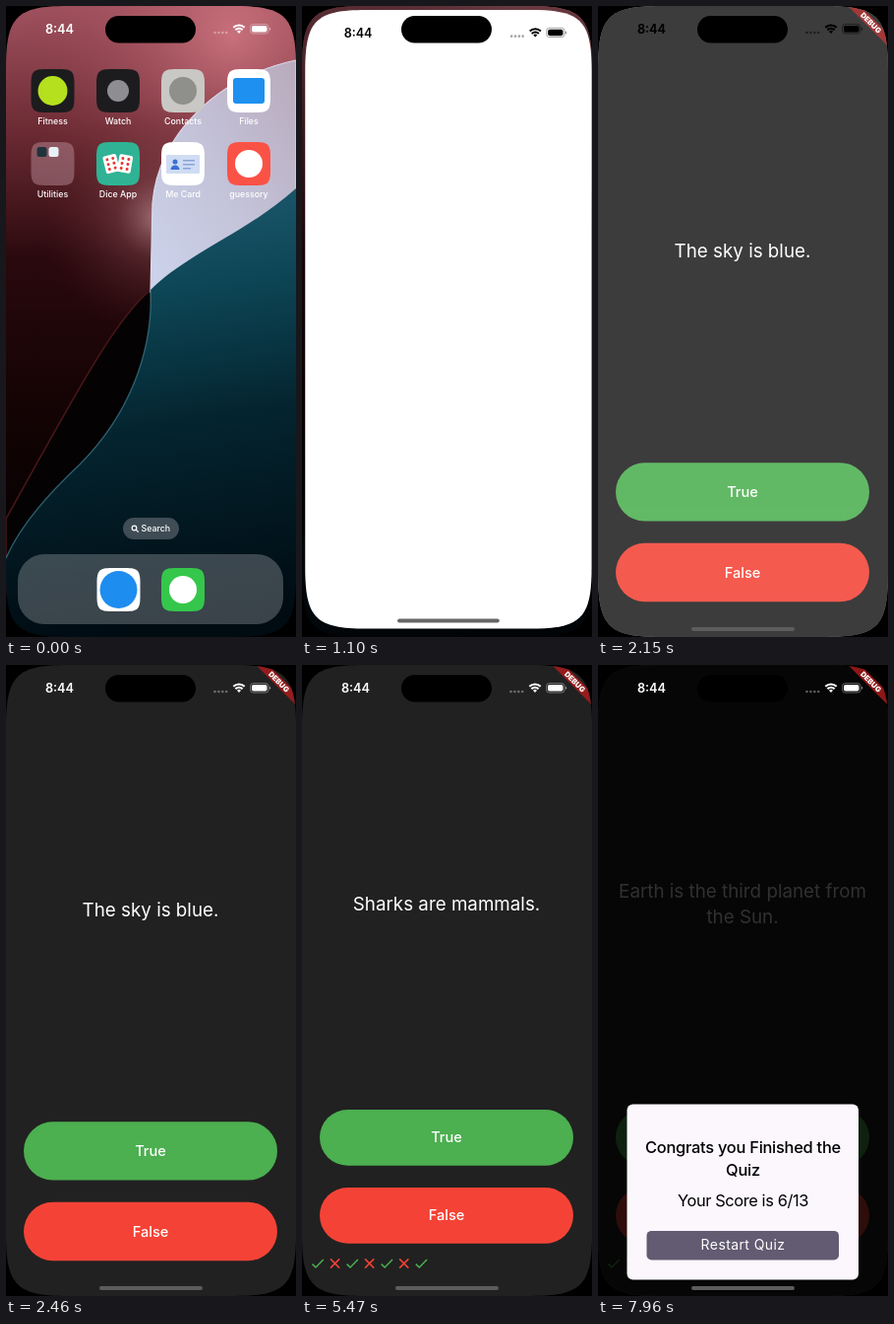
An HTML page for the animation above (8 s loop, 295x640 px).

```html
<!DOCTYPE html>
<html lang="en">
<head>
<meta charset="utf-8">
<title>Quiz app demo</title>
<style>
  html, body { margin: 0; width: 100%; height: 100%; overflow: hidden; background: #000; }
  svg { display: block; width: 100vw; height: 100vh; font-family: Inter, Roboto, sans-serif; }
  text { text-anchor: middle; }
  .label { font-size: 8.8px; font-weight: 500; fill: #fff; }
  .question { font-size: 18.8px; fill: #fff; }
  .button { font-size: 14.6px; font-weight: 500; fill: #fff; }
  #icons { transform-origin: 147.5px 320px; }
</style>
</head>
<body>
<svg viewBox="0 0 295 640">
  <defs>
    <clipPath id="screenClip"><path id="screenShape"/></clipPath>
    <clipPath id="trueClip"><rect class="trueShape" x="18" width="258"/></clipPath>
    <linearGradient id="red" x2="0" y2="1">
      <stop stop-color="#a0525f"/><stop offset=".2" stop-color="#6b2a33"/>
      <stop offset=".4" stop-color="#2a090d"/><stop offset=".6" stop-color="#170405"/>
      <stop offset=".85" stop-color="#050101"/>
    </linearGradient>
    <radialGradient id="rose" gradientUnits="userSpaceOnUse" cx="230" cy="30" r="220">
      <stop stop-color="#d57a86" stop-opacity=".8"/><stop offset="1" stop-color="#8a3b45" stop-opacity="0"/>
    </radialGradient>
    <radialGradient id="glow" gradientUnits="userSpaceOnUse" cx="155" cy="215" r="120">
      <stop stop-color="#c08f98" stop-opacity=".75"/><stop offset=".35" stop-color="#8a4a52" stop-opacity=".4"/>
      <stop offset="1" stop-color="#5a1c22" stop-opacity="0"/>
    </radialGradient>
    <linearGradient id="lavender" x1="1" y1="0" x2="0" y2="1">
      <stop stop-color="#b9aabc"/><stop offset=".5" stop-color="#c3c2d8"/><stop offset="1" stop-color="#ccd4ec"/>
    </linearGradient>
    <linearGradient id="teal" x1=".3" x2=".4" y2="1">
      <stop stop-color="#1f5a70"/><stop offset=".25" stop-color="#0d4656"/>
      <stop offset=".55" stop-color="#04242f"/><stop offset="1" stop-color="#000b12"/>
    </linearGradient>
    <g id="status">
      <text x="54.5" y="28" font-size="12.7" font-weight="600" fill="currentColor">8:44</text>
      <g fill="currentColor" opacity=".35">
        <circle cx="212.5" cy="27" r="1.3"/><circle cx="216.4" cy="27" r="1.3"/>
        <circle cx="220.3" cy="27" r="1.3"/><circle cx="224.2" cy="27" r="1.3"/>
      </g>
      <g fill="none" stroke="currentColor" stroke-width="2">
        <path d="M231.3 21.8a8 8 0 0 1 11.4 0M233.4 24.3a5 5 0 0 1 7.2 0"/>
      </g>
      <path d="M237 28l-2-2.2a2.8 2.8 0 0 1 4 0z" fill="currentColor"/>
      <rect x="248.5" y="18.5" width="18.5" height="9.5" rx="3" fill="none" stroke="currentColor" stroke-width=".8" opacity=".45"/>
      <rect x="250" y="20" width="15.5" height="6.5" rx="1.8" fill="currentColor"/>
      <path d="M268 21.5a2 2 0 0 1 0 3.6z" fill="currentColor" opacity=".5"/>
    </g>
    <path id="right" d="M-5.5 .6L-2 4 5.8-4" fill="none" stroke="#4caf50" stroke-width="1.5"/>
    <path id="wrong" d="M-4.6-4.6L4.6 4.6M4.6-4.6L-4.6 4.6" fill="none" stroke="#f44336" stroke-width="1.5"/>
  </defs>

  <g clip-path="url(#screenClip)">
    <g id="home">
      <rect width="295" height="640" fill="url(#red)"/>
      <rect width="295" height="300" fill="url(#rose)"/>
      <rect width="295" height="400" fill="url(#glow)"/>
      <g id="waves">
        <path d="M147 288C108 320 62 410 0 520V640H160Z" fill="#050203" stroke="#4a1719" stroke-width="1.5"/>
        <path d="M295 55C215 72 155 130 149 200L147 290 295 215Z" fill="url(#lavender)" stroke="#dcd8ea" stroke-width="1.2"/>
        <path d="M147 288C185 250 245 230 295 185V640H0V560C15 525 45 493 75 465 125 415 150 350 147 288Z" fill="url(#teal)"/>
        <path d="M147 288C150 350 125 415 75 465 45 493 15 525 0 560" fill="none" stroke="#3f7f92" stroke-width="1.3" opacity=".7"/>
      </g>
      <rect id="homeDim" width="295" height="640"/>
      <g id="icons"></g>
      <use id="homeStatus" href="#status" color="#fff"/>
    </g>

    <g id="window">
      <path id="windowShape" fill="#fff"/>
      <g id="windowTop"><use href="#status" color="#000"/></g>
      <g id="windowBottom"><rect x="95" y="-10" width="105" height="4" rx="2" fill="#666"/></g>
      <g id="windowIcon"></g>
    </g>

    <g id="quiz">
      <rect width="295" height="640" fill="#212121"/>
      <g id="question"></g>
      <rect class="trueShape" x="18" width="258" fill="#4caf50"/>
      <g clip-path="url(#trueClip)"><circle id="ripple" fill="#5b4896"/></g>
      <rect id="falseShape" x="18" width="258" fill="#f44336"/>
      <text id="trueText" class="button" x="147">True</text>
      <text id="falseText" class="button" x="147">False</text>
      <g id="marks"></g>
      <rect id="barrier" width="295" height="640"/>
      <g id="dialog">
        <rect x="29.5" y="231" width="235.5" height="178" rx="6" fill="#fbf7fd"/>
        <g font-size="16.4" fill="#000">
          <g font-weight="500" letter-spacing="-.25">
            <text x="147.5" y="280.5">Congrats you Finished the</text>
            <text x="147.5" y="304">Quiz</text>
          </g>
          <text x="147.5" y="335" letter-spacing="-.4">Your Score is 6/13</text>
        </g>
        <rect x="49.5" y="359.5" width="195.5" height="29.5" rx="5" fill="#625b71"/>
        <text x="147.5" y="379" font-size="14" letter-spacing=".4" fill="#fff">Restart Quiz</text>
      </g>
      <g transform="translate(277.6 17) rotate(45)">
        <rect x="-45" y="-4.5" width="90" height="9" fill="#b71c1c" opacity=".78"/>
        <text y="2.7" font-size="7.5" font-weight="900" fill="#fff">DEBUG</text>
      </g>
      <rect x="95" y="630" width="105" height="4" rx="2" fill="#5c5c5c"/>
    </g>
    <use id="quizStatus" href="#status"/>
    <rect x="101" y="10" width="92" height="27.5" rx="13.7"/>
  </g>
</svg>

<script>
const LOOP = 8000;
const TAP = 500, OPEN = 640, OPENED = 1450, QUIZ = 1990, DIALOG = 7828;
const PRESS = 90, RIPPLE_FADE = 180;
const answers = [3000, 3390, 3770, 4180, 4560, 4930, 5290, 5700, 6100, 6540, 6960, 7390, 7820];
const questions = [
  ['The sky is blue.'], ['Cats are reptiles.'], ['The Earth is round.'], ['Water boils at 90°C.'],
  ['Fish live in water.'], ['The moon is a star.'], ['Ice is frozen water.'], ['Sharks are mammals.'],
  ['Humans have two lungs.'], ['Spiders have six legs.'], ['The sun is a star.'], ['Bees are birds.'],
  ['Earth is the third planet from', 'the Sun.']
];

const $ = id => document.getElementById(id);
const set = (node, attrs) => { for (const key in attrs) node.setAttribute(key, attrs[key]); };
const show = (node, on) => { node.style.display = on ? '' : 'none'; };
const clamp = v => Math.min(1, Math.max(0, v));
const mix = (a, b, p) => a + (b - a) * p;

// Rounded box with continuous corners; r is the reach of each corner curve.
function squircle(x, y, w, h, r) {
  const c = r * .17, X = x + w, Y = y + h;
  return `M${x} ${y + r}C${x} ${y + c} ${x + c} ${y} ${x + r} ${y}H${X - r}` +
    `C${X - c} ${y} ${X} ${y + c} ${X} ${y + r}V${Y - r}` +
    `C${X} ${Y - c} ${X - c} ${Y} ${X - r} ${Y}H${x + r}` +
    `C${x + c} ${Y} ${x} ${Y - c} ${x} ${Y - r}Z`;
}

const disc = (color, r) => `<circle cx="22" cy="22" r="${r}" fill="${color}"/>`;
const box = (x, y, w, h, color, rx = 0) =>
  `<rect x="${x}" y="${y}" width="${w}" height="${h}" rx="${rx}" fill="${color}"/>`;
const tile = (x, y, color, art = '', label = '') =>
  `<g transform="translate(${x} ${y})"><path d="${squircle(0, 0, 44, 44, 15)}" fill="${color}"/>${art}` +
  `<text class="label" x="22" y="56">${label}</text></g>`;

function die(x, y, angle) {
  let pips = '';
  for (let i = 0; i < 6; i++)
    pips += `<circle cx="${i % 2 ? 3 : -3}" cy="${(i >> 1) * 5 - 5}" r="1.5" fill="#e53935"/>`;
  return `<g transform="translate(${x} ${y}) rotate(${angle})">${box(-7, -9, 14, 18, '#fff', 2)}${pips}</g>`;
}

const card = box(5, 13, 34, 19, '#cfdcf3', 1) +
  '<circle cx="14" cy="20" r="2.5" fill="#3b6fd4"/><path d="M9.5 28a4.5 4.5 0 0 1 9 0z" fill="#3b6fd4"/>' +
  box(22, 18, 12, 1.5, '#8aa4d8') + box(22, 22, 12, 1.5, '#8aa4d8') + box(22, 26, 8, 1.5, '#8aa4d8');
const appArt = disc('#fff', 14);

$('icons').innerHTML =
  tile(25.5, 64, '#1c1c1e', disc('#b4e01e', 15), 'Fitness') +
  tile(92, 64, '#1c1c1e', disc('#8e8e92', 11), 'Watch') +
  tile(158, 64, '#c9c8c4', disc('#8f8f8c', 14), 'Contacts') +
  tile(225, 64, '#fff', box(6, 9, 32, 26, '#1e90f0', 3), 'Files') +
  tile(25.5, 138, 'rgba(190,150,160,.45)',
    box(6, 5, 10, 10, '#20333c', 2.5) + box(18, 5, 10, 10, '#e8f0f5', 2.5), 'Utilities') +
  tile(92, 138, '#2fb394', die(15, 22, -14) + die(29, 22, 10), 'Dice App') +
  tile(158, 138, '#fff', card, 'Me Card') +
  `<g id="launcher">${tile(225, 138, '#fb5246', appArt, 'guessory')}</g>` +
  box(119, 519, 57, 22, 'rgba(125,130,138,.5)', 11) +
  '<g fill="none" stroke="#fff" stroke-width="1.2"><circle cx="130.5" cy="529.5" r="2.3"/><path d="M132.2 531.2l2.5 2.5"/></g>' +
  '<text class="label" x="152.3" y="533.3">Search</text>' +
  box(12, 556, 270, 71, 'rgba(130,136,142,.45)', 27) +
  tile(92.5, 570, '#fff', disc('#1e8df0', 19)) +
  tile(158, 570, '#35c74b', disc('#fff', 14));

$('windowIcon').innerHTML = tile(0, 0, '#fb5246', appArt);
set($('screenShape'), { d: squircle(0, 0, 295, 640, 63) });

function drawHome(t) {
  show($('home'), t < OPENED);
  show($('window'), t >= OPEN && t < QUIZ + 300);
  $('launcher').style.opacity = t < TAP ? 1 : t < OPEN ? .7 : 0;
  // Critically damped spring
  const s = Math.max(0, t - OPEN) * .0135;
  const p = 1 - (1 + s) * Math.exp(-s);
  const blur = p > 0 ? `blur(${11 * p}px)` : 'none';

  set($('homeDim'), { opacity: .45 * p });
  set($('homeStatus'), { opacity: 1 - .4 * p });
  $('waves').style.filter = blur;
  $('icons').style.filter = blur;
  $('icons').style.transform = `scale(${1 - .07 * p})`;
  $('icons').style.opacity = 1 - .6 * p;

  const w = mix(44, 295, p), h = mix(44, 640, p ** 1.47), k = w / 295;
  const x = mix(247, 147.5, p) - w / 2, y = mix(160, 320, p) - h / 2;
  set($('windowShape'), { d: squircle(x, y, w, h, mix(15, 63, p)) });
  set($('windowTop'), { transform: `translate(${x} ${y}) scale(${k})` });
  set($('windowBottom'), { transform: `translate(${x} ${y + h}) scale(${k})` });
  set($('windowIcon'), {
    transform: `translate(${x} ${y}) scale(${w / 44} ${h / 44})`,
    opacity: clamp(1 - 1.6 * p)
  });
}

function drawQuiz(t) {
  show($('quiz'), t >= QUIZ);
  show($('quizStatus'), t >= QUIZ);
  const fade = clamp((t - QUIZ) / 250);
  $('quiz').style.opacity = 1 - (1 - fade) ** 2;
  const light = Math.round(255 * clamp((t - 2200) / 250));
  set($('quizStatus'), { color: `rgb(${light},${light},${light})` });

  // The first mark adds a row below the buttons, which squeezes the layout.
  const count = answers.filter(a => a <= t).length;
  const [middle, trueY, falseY, height] = count ? [249, 451, 530, 56.7] : [255, 463.2, 544.8, 59.4];
  const lines = questions[Math.min(count, questions.length - 1)];
  $('question').innerHTML = lines.map((line, i) =>
    `<text class="question" x="147" y="${middle + 26.5 * (i - (lines.length - 1) / 2)}">${line}</text>`).join('');
  for (const node of document.querySelectorAll('.trueShape')) set(node, { y: trueY, height, rx: height / 2 });
  set($('falseShape'), { y: falseY, height, rx: height / 2 });
  set($('trueText'), { y: trueY + height / 2 + 5 });
  set($('falseText'), { y: falseY + height / 2 + 5 });
  $('marks').innerHTML = answers.slice(0, count).map((_, i) =>
    `<use href="#${i % 2 ? 'wrong' : 'right'}" x="${16 + 17.55 * i}" y="607"/>`).join('');

  const tap = answers.findLast(a => a - PRESS <= t) ?? Infinity;
  const age = t - tap;
  set($('ripple'), {
    cx: 132, cy: 497, r: Math.max(0, .335 * (age + PRESS)),
    opacity: tap < Infinity ? .22 * clamp(1 - age / RIPPLE_FADE) : 0
  });

  const u = clamp((t - DIALOG) / 200);
  set($('barrier'), { opacity: .87 * (1 - (1 - u) ** 2.5) });
  set($('dialog'), { transform: `translate(0 ${640 * (1 - u)})` });
}

function frame() {
  const t = performance.now() % LOOP;
  drawHome(t);
  drawQuiz(t);
  requestAnimationFrame(frame);
}
frame();
</script>
</body>
</html>
```
